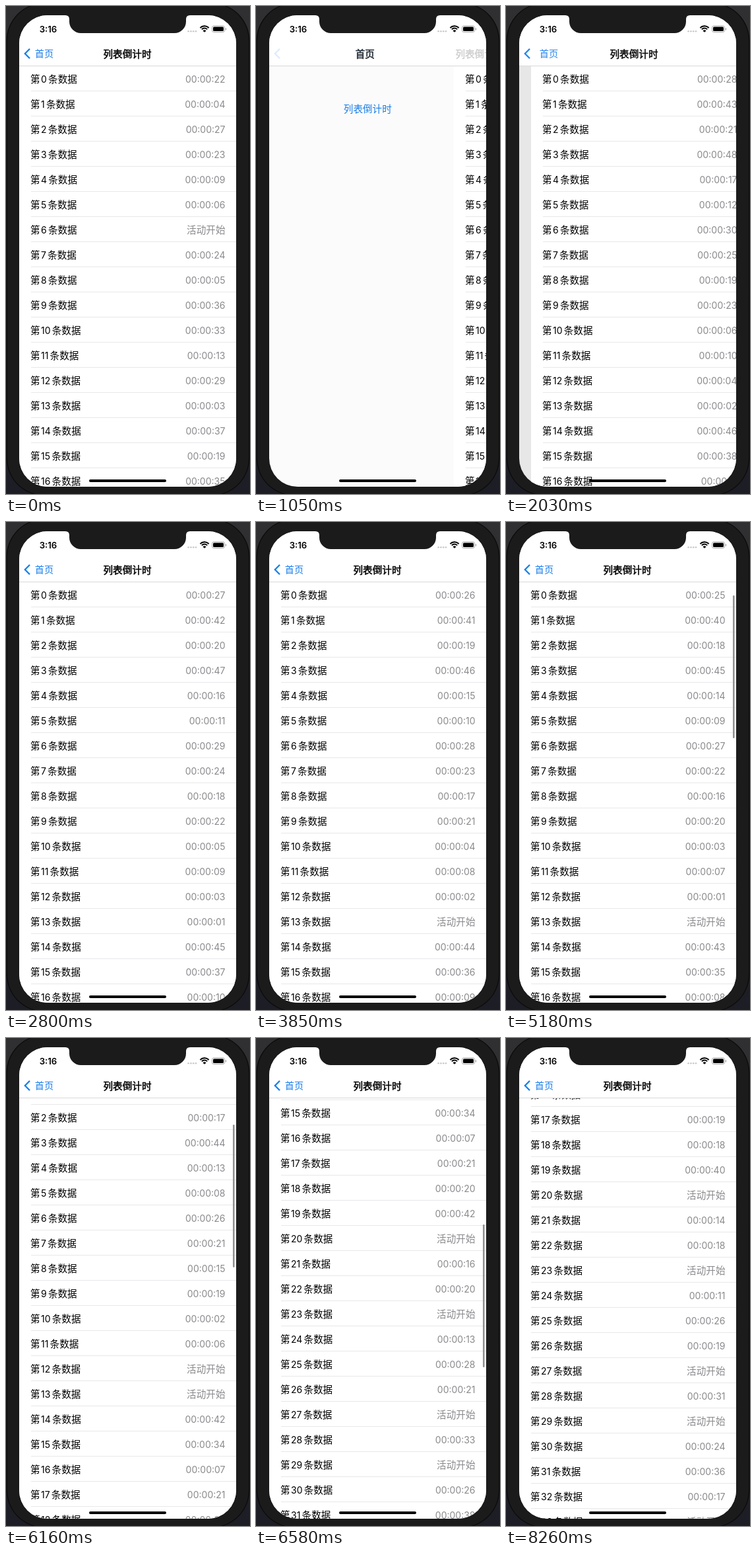
These frames come from a looping animation (370x738 px, 8.47 s). An HTML page with a canvas:

```html
<!DOCTYPE html>
<html lang="zh">
<head>
<meta charset="utf-8">
<style>
  html, body { margin: 0; width: 100%; height: 100%; overflow: hidden; background: #1b1b1b; }
  canvas { display: block; }
</style>
</head>
<body>
<canvas id="stage" width="370" height="738"></canvas>
<script>
const ctx = document.getElementById('stage').getContext('2d');
const LOOP = 8470, STEP = 70, TICK = 1050;
const SCREEN = { x: 20, y: 14, w: 329, h: 713 };
const NAV_BOTTOM = 91, ROW = 38, MID = 184;
const BLUE = '#1a7fea', GREY = '#8a8a8e';
const CJK = '"Noto Sans CJK SC", "Noto Sans CJK", sans-serif';
const HAN = `14.6px ${CJK}`;
const DIGITS = `14px Inter, ${CJK}`;

// Seconds left in each row when its list opens; 0 means already started.
const firstList = [22, 4, 27, 23, 9, 6, 0, 24, 5, 36, 33, 13, 29, 3, 37, 19, 35];
const secondList = [28, 43, 21, 48, 17, 12, 30, 25, 19, 23, 6, 10, 4, 2, 46, 38, 11,
  25, 24, 46, 0, 20, 24, 0, 17, 32, 25, 0, 37, 0, 30, 42, 23, 0];

const clamp = v => Math.min(1, Math.max(0, v));
const smooth = u => u * u * (3 - 2 * u);
// Critically damped spring falling from 1 to 0.
const settle = (ms, rate) => {
  const x = Math.max(0, ms) / 1000 * rate;
  return (1 + x) * Math.exp(-x);
};

function text(str, x, y, font, color, align = 'left') {
  ctx.font = font;
  ctx.fillStyle = color;
  ctx.textAlign = align;
  ctx.fillText(str, x, y);
}

// Semi-bold look: regular glyphs with a thin outline.
function titleText(str, x) {
  text(str, x, 77.5, HAN, '#000', 'center');
  ctx.strokeStyle = '#000';
  ctx.lineWidth = 0.5;
  ctx.strokeText(str, x, 77.5);
}

function box(x, y, w, h, color, r = 0) {
  ctx.fillStyle = color;
  ctx.beginPath();
  ctx.roundRect(x, y, w, h, r);
  ctx.fill();
}

function line(points, color, width, cap = 'butt') {
  ctx.strokeStyle = color;
  ctx.lineWidth = width;
  ctx.lineCap = cap;
  ctx.beginPath();
  points.forEach(([x, y]) => ctx.lineTo(x, y));
  ctx.stroke();
}

function faded(alpha, draw) {
  ctx.save();
  ctx.globalAlpha = clamp(alpha);
  draw();
  ctx.restore();
}

function clipped(x, y, w, h, r, draw) {
  ctx.save();
  ctx.beginPath();
  ctx.roundRect(x, y, w, h, r);
  ctx.clip();
  draw();
  ctx.restore();
}

// How far the list page is pushed off to the right: 0 covers the screen, 1 is gone.
const pageShift = t => t < 1600 ? 1 - settle(t - 860, 17.8) : settle(t - 1770, 17.8);

function pullDistance(t) {
  if (t < 4550) return 70.8 * Math.sin(Math.PI / 2 * clamp((t - 4060) / 490));
  return 70.8 * settle(t - 4550, 12);
}

const scrollDistance = t => 633 * smooth(clamp((t - 6020) / 700));

function drawRow(n, top, seconds) {
  const base = top + 25;
  text('第', 37, base, HAN, '#000');
  text(n, 53, base, DIGITS, '#000');
  const end = 53 + ctx.measureText(n).width;
  text('条数据', end + 2.2, base, HAN, '#000');
  if (seconds > 0) {
    text('00:00:' + String(seconds).padStart(2, '0'), 332.5, base, DIGITS, GREY, 'right');
  } else {
    text('活动开始', 332.5, base, HAN, GREY, 'right');
  }
  box(38, top + 37, 311, 1, '#e8e8ea');
}

function drawSpinner(pull) {
  const amount = (pull - 40) / 20;
  for (let i = 0; i < 8; i++) {
    const angle = i * Math.PI / 4, dx = Math.sin(angle), dy = -Math.cos(angle);
    faded(0.38 * clamp(amount - i), () => line(
      [[MID + 0.5 + dx * 6.3, 117 + dy * 6.3], [MID + 0.5 + dx * 11.6, 117 + dy * 11.6]],
      '#000', 3, 'round'));
  }
}

function drawList(t, shift) {
  const first = t < 1600;
  const rows = first ? firstList : secondList;
  const elapsed = Math.floor((first ? t + 350 : t - 1750) / TICK);
  const pull = Math.round(pullDistance(t)), scroll = Math.round(scrollDistance(t));

  ctx.save();
  ctx.translate(Math.round(shift * SCREEN.w), 0);
  box(SCREEN.x, NAV_BOTTOM, SCREEN.w, 640, '#fff');
  drawSpinner(pull);
  rows.forEach((seconds, n) => {
    const top = NAV_BOTTOM + n * ROW + pull - scroll;
    if (top > NAV_BOTTOM - ROW && top < 730) drawRow(n, top, seconds - elapsed);
  });
  if (t >= 4130 && t < 8260) {
    faded(t < 8190 ? 1 : 0.4, () =>
      box(344, 111 + scroll * 0.3016, 2.6, 216 - pull, '#929292', 1.3));
  }
  ctx.restore();
}

function drawHome(t, shift) {
  const pressed = t >= 1610 && t < 1680;
  const x = MID - 0.3 * SCREEN.w * (1 - shift);
  faded(pressed ? 0.25 : 1, () => text('列表倒计时', x, 161, HAN, BLUE, 'center'));
  faded(0.1 * (1 - shift), () => box(SCREEN.x, NAV_BOTTOM, SCREEN.w, 640, '#000'));
}

function drawNavBar(t, shift) {
  const backAlpha = (t >= 770 && t < 910 ? 0.3 : 1) * (1 - shift);
  const backX = 58 + 126 * shift;
  box(SCREEN.x, SCREEN.y, SCREEN.w, NAV_BOTTOM - SCREEN.y - 1, '#fff');
  box(SCREEN.x, NAV_BOTTOM - 1, SCREEN.w, 1.3, '#dededf');
  faded(1 - shift, () => titleText('列表倒计时', MID + 182 * shift));
  faded(shift * 1.2 - 0.2, () => titleText('首页', backX));
  faded(backAlpha, () => {
    text('首页', backX, 77, `14.2px ${CJK}`, BLUE, 'center');
    line([[36, 64.8], [28.8, 72], [36, 79.2]], BLUE, 2.3);
  });
}

function drawStatusBar() {
  text('3:16', 64, 39.5, '600 13.2px Inter, sans-serif', '#000', 'center');
  for (let i = 0; i < 4; i++) box(275.3 + i * 3.8, 37, 2.6, 2.6, '#c9c9c9', 1.3);
  ctx.strokeStyle = '#000';
  ctx.lineWidth = 2;
  ctx.lineCap = 'butt';
  for (const r of [9, 5.7]) {
    ctx.beginPath();
    ctx.arc(301, 39.3, r, -Math.PI * 0.76, -Math.PI * 0.24);
    ctx.stroke();
  }
  ctx.fillStyle = '#000';
  ctx.beginPath();
  ctx.moveTo(301, 39.8);
  ctx.arc(301, 39.8, 3.4, -Math.PI * 0.76, -Math.PI * 0.24);
  ctx.fill();
  ctx.strokeStyle = '#a8a8a8';
  ctx.lineWidth = 1;
  ctx.beginPath();
  ctx.roundRect(312.5, 30, 19, 9.6, 2.8);
  ctx.stroke();
  box(314, 31.5, 16, 6.6, '#000', 1.5);
  box(332.8, 33.2, 1.3, 3.4, '#a8a8a8', 0.6);
}

function drawBody() {
  const back = ctx.createLinearGradient(0, 0, 0, 738);
  back.addColorStop(0, '#303032');
  back.addColorStop(0.5, '#252528');
  back.addColorStop(1, '#1d1d26');
  box(0, 0, 370, 738, back);
  box(0.5, -5, 369, 746, '#0c0c0c', 58);
  box(2, -3.5, 366, 743, '#1b1b1b', 56);
}

function drawNotch() {
  ctx.fillStyle = '#1b1b1b';
  ctx.beginPath();
  ctx.moveTo(90, 13);
  ctx.lineTo(90, 14);
  ctx.quadraticCurveTo(96, 14, 96, 20);
  ctx.arcTo(96, 41, 116, 41, 17.5);
  ctx.lineTo(252, 41);
  ctx.arcTo(273, 41, 273, 20, 17.5);
  ctx.lineTo(273, 20);
  ctx.quadraticCurveTo(273, 14, 279, 14);
  ctx.lineTo(279, 13);
  ctx.fill();
}

function draw(t) {
  const shift = pageShift(t);
  const { x, y, w, h } = SCREEN;
  drawBody();
  clipped(x, y, w, h, 43, () => {
    box(x, y, w, h, '#fff');
    clipped(x, NAV_BOTTOM - 1, w, 640, 0, () => {
      drawHome(t, shift);
      drawList(t, shift);
    });
    drawNavBar(t, shift);
    drawStatusBar();
    box(126, 716, 117, 4, '#000', 2);
  });
  drawNotch();
}

const start = performance.now();
function frame() {
  const t = (performance.now() - start) % LOOP;
  draw(Math.floor(t / STEP) * STEP);
  requestAnimationFrame(frame);
}
frame();
</script>
</body>
</html>
```
